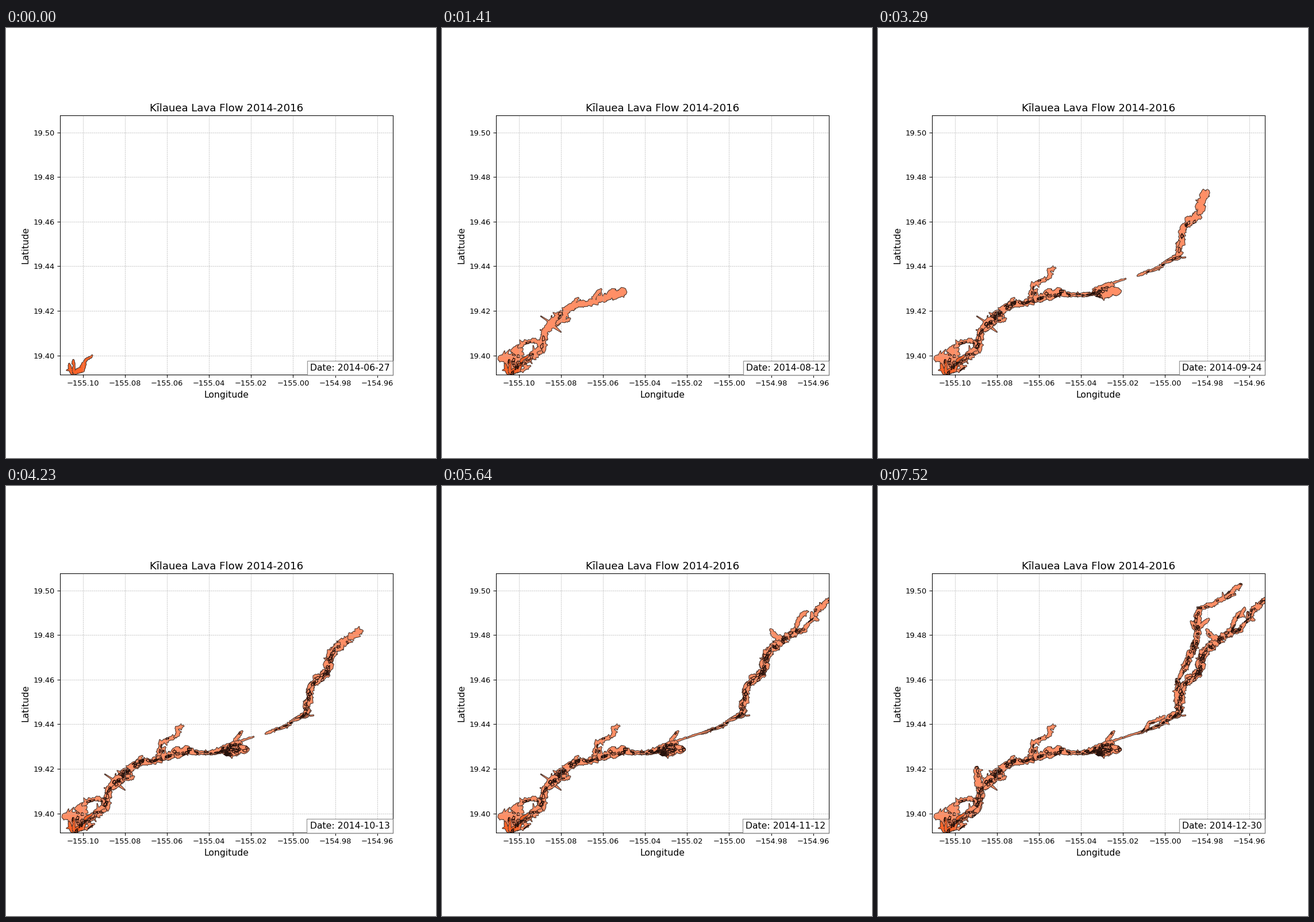
Write a matplotlib script that moves like this. It is 748x748 px and loops after 7990 ms.

```python
import matplotlib.pyplot as plt
import numpy as np
from matplotlib.animation import FuncAnimation
from matplotlib.collections import LineCollection, PolyCollection

SIZE, DPI, STEP_MS = 748, 93.5, 470
LEFT, RIGHT, TOP, BOTTOM = 93.5, 673.2, 152.3, 603.3
DATES = ("06-27 07-08 07-29 08-12 08-22 09-03 09-15 09-24 10-03 "
         "10-13 10-22 10-31 11-12 11-24 12-04 12-16 12-30").split()
LAVA, HOT, RIM, SEAM = "#ff8f66", "#ff6429", "#4a362e", "#24100a"

rng = np.random.default_rng(14)
areas = [[] for _ in DATES]
seams = [[] for _ in DATES]


def to_map(x, y):
    """Stage pixels to longitude and latitude."""
    return np.c_[-155.10 + (x - 133.9) / 3655, 19.40 + (569.6 - y) / 3879]


def noise(n, k):
    raw = rng.normal(size=n + k - 1)
    return np.convolve(raw, np.ones(k), "valid") / np.sqrt(k)


def course(keys, step=1.5):
    """Meandering centre line through (x, y, width) keys."""
    p = np.array(keys, float)
    d = np.r_[0, np.cumsum(np.hypot(*np.diff(p[:, :2], axis=0).T))]
    s = np.linspace(0, d[-1], max(5, int(d[-1] / step)))
    x, y, w = (np.interp(s, d, p[:, i]) for i in range(3))
    sway = 0.12 * np.minimum(w, 8) * noise(len(x), 7)
    nx, ny = normals(x, y)
    return np.array([x + nx * sway, y + ny * sway, w])


def normals(x, y):
    dx, dy = np.gradient(x), np.gradient(y)
    length = np.hypot(dx, dy) + 1e-9
    return -dy / length, dx / length


def tongue(step, x, y, w):
    """Ragged lava area around a centre line, tapered at both ends."""
    n = len(x)
    nx, ny = normals(x, y)
    end = np.minimum(np.arange(n), np.arange(n)[::-1])
    w = w * np.minimum(1, (end + 1.5) / 5)
    sides = []
    for sign in (1, -1):
        spur = (rng.random(n) < 0.13) * rng.exponential(0.28 * np.minimum(w, 9))
        off = 0.5 * w * (1 + 0.2 * noise(n, 3)) + spur
        off += 0.5 * np.minimum(1, w / 6) * rng.normal(size=n)
        off = sign * np.maximum(off, 0.5)
        sides.append(to_map(x + nx * off, y + ny * off))
    areas[step].append(np.r_[sides[0], sides[1][::-1]])


def later(step):
    return min(step + rng.integers(1, 4), len(DATES) - 1)


def islands(step, x, y, w, rate):
    """Small crooked loops where later lava closed around older lava."""
    nx, ny = normals(x, y)
    turn = np.linspace(0, 2 * np.pi, 11)
    for _ in range(int(rate * len(x) * w.mean() / 28)):
        i = rng.integers(len(x))
        r = rng.uniform(0.5, 1.4, 11)
        r[-1] = r[0]
        along = rng.uniform(1.5, 5) * r * np.cos(turn)
        across = rng.uniform(-0.35, 0.35) * w[i]
        across = across + min(0.22 * w[i], 2.5) * r * np.sin(turn)
        seams[later(step)].append(to_map(x[i] + nx[i] * across + ny[i] * along,
                                         y[i] + ny[i] * across - nx[i] * along))


def branch(step, width, *keys, rate=0.5):
    line = course([(x, y, width) for x, y in keys])
    tongue(step, *line)
    islands(step, *line, rate)


def trunk(first, fronts, keys):
    """Main flow whose front reaches one x after another, with later breakouts."""
    line = course(keys)
    start = 0
    for step, front in enumerate(fronts, first):
        stop = np.searchsorted(np.maximum.accumulate(line[0]), front)
        piece = line[:, max(0, start - 4):stop]
        tongue(step, *piece)
        islands(step, *piece, 1)
        for _ in range(piece.shape[1] // 14):
            a = rng.integers(max(1, piece.shape[1] - 8))
            x, y, w = piece[:, a:a + rng.integers(7, 16)]
            nx, ny = normals(x, y)
            off = rng.choice((-0.35, 0.35)) * w
            tongue(later(step), x + nx * off, y + ny * off, 0.5 * w)
        start = stop


# Vent
branch(0, 4, (109, 584), (116, 603))
branch(0, 3.5, (117, 577), (118, 601))
branch(0, 7, (117, 599), (131, 594), (139, 580))
branch(0, 3.5, (136, 583), (141, 576), (150, 569))

# Lava field around the vent
branch(1, 14, (98, 573), (146, 581), rate=0.1)
branch(1, 28, (110, 579), (138, 579), rate=0.1)
branch(1, 14, (120, 602), (128, 568), (135, 552), rate=0.3)
branch(1, 4, (120, 600), (140, 595), (154, 588))
branch(2, 6, (132, 555), (142, 547), (162, 544), (174, 556))
branch(2, 6, (142, 584), (152, 575), (172, 564))

trunk(1, (155, 215, 322, 380, 405), [
    (124, 592, 6), (150, 573, 8), (173, 556, 12), (180, 528, 9), (192, 511, 15),
    (212, 498, 13), (224, 484, 9), (258, 478, 9), (282, 470, 9), (298, 463, 15),
    (315, 461, 12), (335, 465, 5), (372, 462, 5), (390, 462, 13), (406, 465, 6)])
trunk(5, (516, 560, 576, 600, 622, 630, 680), [
    (451, 431, 3), (490, 416, 4), (500, 407, 4), (522, 398, 8), (526, 362, 10),
    (533, 346, 10), (562, 318, 14), (564, 295, 11), (586, 271, 12), (612, 254, 9),
    (630, 250, 7), (641, 237, 4), (658, 212, 8), (680, 193, 4)])

# Side branches
branch(2, 4, (203, 508), (207, 494))
branch(3, 5, (222, 485), (237, 469))
branch(3, 5, (198, 514), (223, 505))
branch(3, 6, (262, 472), (278, 455))
branch(4, 5, (266, 472), (268, 447), (296, 436))
branch(5, 5, (293, 438), (299, 432), (297, 420), (309, 417), rate=0)
branch(5, 4, (398, 462), (404, 456), (407, 446))
branch(5, 2, (524, 401), (527, 398))
branch(5, 2, (529, 400), (535, 399))
branch(6, 9, (374, 462), (392, 452), (410, 445), rate=1.5)
branch(6, 2, (406, 444), (431, 436))
branch(7, 12, (382, 464), (422, 456), rate=1.5)
branch(8, 5, (397, 444), (411, 426))
branch(9, 5, (350, 464), (385, 455))
branch(11, 7, (571, 249), (578, 263), (596, 266))
branch(11, 1.5, (426, 438), (475, 422))
branch(12, 6, (616, 247), (621, 234), (635, 217))
branch(12, 6, (643, 219), (645, 230), (655, 234))
branch(13, 5, (626, 229), (634, 222), (637, 211))
branch(13, 6, (184, 535), (177, 555), (166, 573))

# Late western branch and last breakouts
branch(14, 7, (525, 394), (520, 368), (522, 336), rate=1)
branch(14, 5, (523, 336), (538, 305), (546, 282), (552, 265))
branch(14, 7, (490, 413), (518, 395), rate=1)
branch(15, 9, (532, 322), (543, 292), (554, 270), (556, 240), (559, 211), rate=1)
branch(15, 5, (557, 247), (576, 231))
branch(15, 6, (558, 214), (580, 207), (606, 193), (612, 184))
branch(15, 9, (180, 535), (174, 515), (173, 488))
branch(16, 6, (604, 195), (618, 181), (633, 171))
branch(16, 4, (604, 194), (622, 189))
branch(16, 5, (544, 235), (554, 252))
branch(16, 4, (462, 426), (472, 412), (500, 401))

fig = plt.figure(figsize=(SIZE / DPI, SIZE / DPI), dpi=DPI, facecolor="white")
ax = fig.add_axes([LEFT / SIZE, 1 - BOTTOM / SIZE,
                   (RIGHT - LEFT) / SIZE, (BOTTOM - TOP) / SIZE])
(west, south), (east, north) = to_map(np.array([LEFT, RIGHT]),
                                      np.array([BOTTOM, TOP]))
ax.set_xticks(np.arange(-155.10, -154.95, 0.02))
ax.set_yticks(np.arange(19.40, 19.505, 0.02))
ax.set_xlim(west, east)
ax.set_ylim(south, north)
ax.ticklabel_format(useOffset=False)
ax.grid(True, linestyle="--", linewidth=0.5)
ax.set_title("Kīlauea Lava Flow 2014-2016", fontsize=14)
ax.set_xlabel("Longitude", fontsize=12)
ax.set_ylabel("Latitude", fontsize=12)
label = ax.text(0.99, 0.01, "", transform=ax.transAxes, fontsize=12,
                ha="right", va="bottom",
                bbox=dict(facecolor="white", edgecolor="gray", alpha=0.8))

# Rims lie below the fills of the same date, so each date gets one joint outline.
layers = []
for i, (area, lines) in enumerate(zip(areas, seams)):
    z = 1.3 if i == 0 else 1 + 0.01 * i
    parts = (PolyCollection(area, facecolors="none", edgecolors=RIM,
                            linewidths=1.7, zorder=z),
             PolyCollection(area, facecolors=LAVA if i else HOT,
                            edgecolors="none", zorder=z + 0.005),
             LineCollection(lines, colors=SEAM, linewidths=0.9, zorder=1.4))
    for part in parts:
        ax.add_collection(part, autolim=False)
    layers.append(parts)


def draw(i):
    for k, parts in enumerate(layers):
        for part in parts:
            part.set_visible(k <= i)
    label.set_text(f"Date: 2014-{DATES[i]}")
    return [label]


anim = FuncAnimation(fig, draw, frames=len(DATES), interval=STEP_MS,
                     repeat=True, repeat_delay=0)
plt.show()
```
